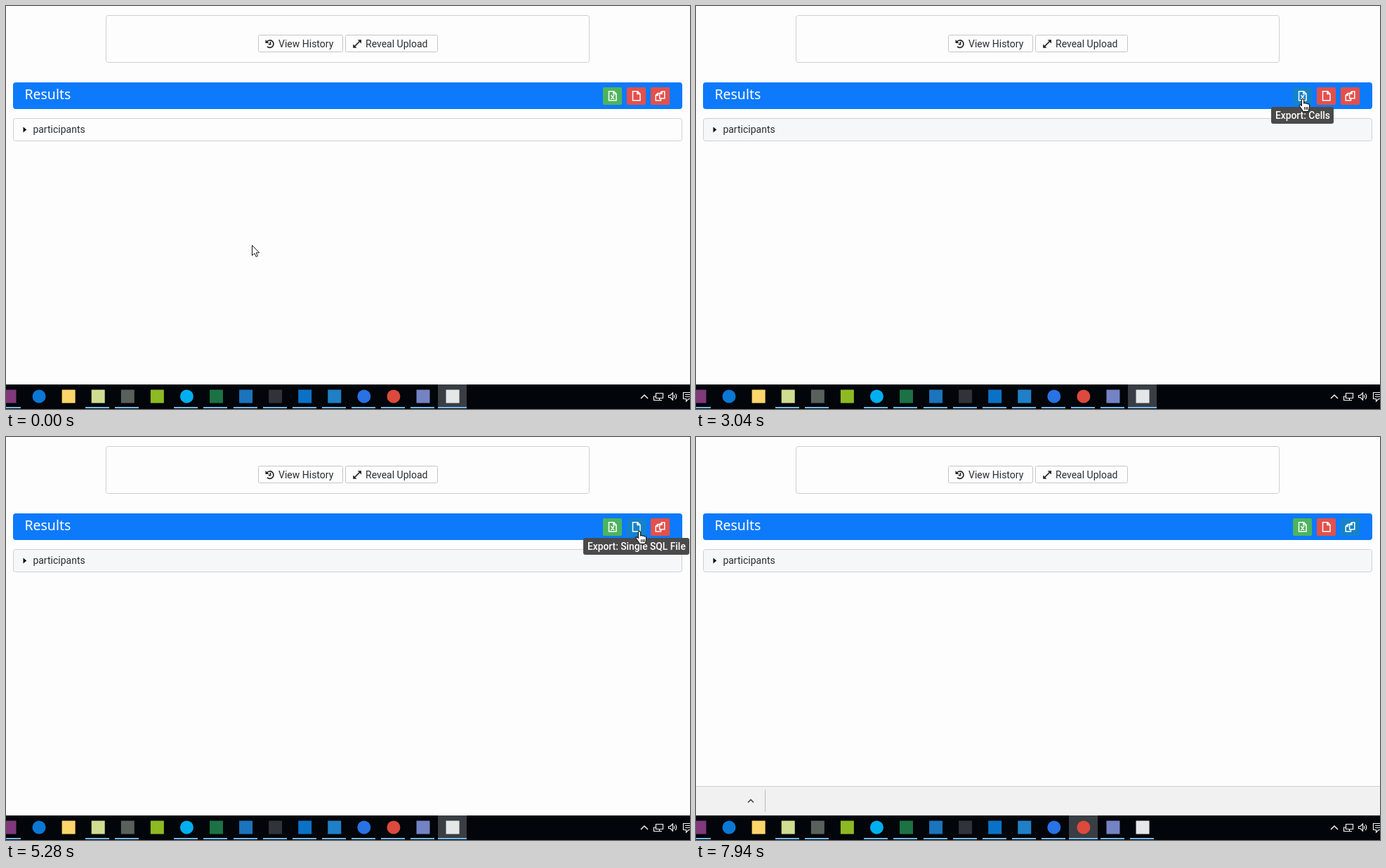
Write an HTML page that moves like this. It is 974x575 px and loops after 8000 ms.

```html
<!DOCTYPE html>
<html lang="en">
<head>
<meta charset="utf-8">
<title>Results export</title>
<style>
  html, body { margin: 0; width: 100%; height: 100%; overflow: hidden; background: #fdfdfd; }
  svg { display: block; width: 974px; height: 575px; }
  text { font-family: Roboto, sans-serif; font-size: 14px; fill: #2b2d30; white-space: pre; }
  .line { fill: none; stroke: #fff; stroke-width: 1.5; }
  .box { fill: #fdfdfd; stroke: #cfcfcf; }
  .tip text { fill: #fff; font-weight: 500; font-size: 13.8px; }
</style>
</head>
<body>
<svg viewBox="0 0 974 575" xmlns="http://www.w3.org/2000/svg">
  <rect width="974" height="575" fill="#fdfdfd"/>
  <rect class="box" x="142.5" y="13.5" width="688" height="67" rx="3"/>
  <g class="box" style="stroke:#c6c6c6">
    <rect x="359.5" y="41.5" width="120" height="24" rx="2"/>
    <rect x="483.5" y="41.5" width="131" height="24" rx="2"/>
  </g>
  <g fill="none" stroke="#222" stroke-width="1.7">
    <path d="M371.6 51A5.2 5.2 0 1 1 372 57.8M376.5 51V54.7H373.8"/>
    <path d="M496.5 57.5L503.5 50.5"/>
  </g>
  <path fill="#222" d="M369.5 48V53H374.5ZM500.7 48.3H506V53.6ZM494.2 54.5V59.8H499.5Z"/>
  <text x="388" y="58.6">View History</text>
  <text x="512" y="58.6">Reveal Upload</text>

  <rect x="10" y="109" width="953" height="38" rx="4" fill="#0d7afc"/>
  <text x="26.4" y="133" style="font:500 19.5px 'Noto Sans',sans-serif;fill:#fff">Results</text>
  <g id="buttons"></g>

  <rect id="row" x="10.5" y="160.5" width="952" height="32" rx="3"/>
  <path d="M24.5 172.5L29.3 176.5L24.5 180.5Z" fill="#111"/>
  <text x="38.4" y="181">participants</text>
  <rect id="underline" x="36" y="182" width="76" height="1" fill="#2b2d30"/>

  <rect id="status" x="-5" y="520.5" width="294.5" height="30" rx="3" fill="#f2f2f2" stroke="#dcdcdc"/>
  <g id="shelf">
    <rect y="498" width="974" height="44" fill="#f1f1f1"/>
    <rect y="498" width="974" height="1" fill="#cfcfcf"/>
    <g id="chip">
      <path d="M74 521.5L78 517.5L82 521.5" fill="none" stroke="#444" stroke-width="1.6"/>
      <rect x="98" y="503" width="1" height="32" fill="#bcbcbc"/>
    </g>
  </g>

  <rect y="540" width="974" height="35" fill="#020509"/>
  <g id="tasks"></g>
  <g fill="none" stroke="#f2f2f2" stroke-width="1.2">
    <path d="M904 560L909 555L914 560" stroke-width="1.5"/>
    <path d="M925.5 552.5H935.5V559.5H925.5ZM930.5 560V562.5M927 562.5H934M925 557H922.5V562.5H927"/>
    <path d="M943.5 555.5H946L949.5 552V562L946 558.5H943.5ZM951.3 555Q952.8 557 951.3 559.2M953.2 553Q956.2 557 953.2 561.2"/>
    <path d="M976 551.5H964.5V560.5H968.5V564L972 560.5H976M967 554.5H974M967 557.5H974"/>
  </g>
  <g id="tips"></g>
  <g id="cursor" stroke="#111" fill="#fff" stroke-linejoin="round">
    <path id="arrow" d="M.5 .5V15L3.9 11.9L6.2 16.8L8.4 15.8L6.2 11H10.7Z"/>
    <path id="hand" d="M-1.6 2A1.6 1.6 0 0 1 1.6 2V7Q3.5 5.8 4.6 7.3Q6.3 6.5 7.3 7.9Q9.5 7.4 9.5 9.1V13Q9.5 15 7.9 18.6H.3Q-.5 16-4.7 11C-5.6 9.4-3.6 8.2-2.5 9.4L-1.6 10.5ZM2.7 12V16M5 12V16M7 12V16" stroke-width="1.1"/>
    <circle id="busy" cx="11.7" cy=".6" r="5" fill="#e8f4ff" stroke="#2a8ded" stroke-width="3.4"/>
  </g>
</svg>
<script>
const $ = id => document.getElementById(id);
const LOOP = 8000, STEP = 72;

function add(parent, tag, attrs, text) {
  const el = document.createElementNS('http://www.w3.org/2000/svg', tag);
  for (const k in attrs) el.setAttribute(k, attrs[k]);
  if (text) el.textContent = text;
  return parent.appendChild(el);
}
const show = (el, on) => el.setAttribute('visibility', on ? 'visible' : 'hidden');
const clamp = v => Math.max(0, Math.min(1, v));
const ramp = (t, a, b) => clamp((t - a) / (b - a));
const within = (t, a, b) => t >= a && t < b;

// Bursts of movement [start, end]; the screen holds between them
const BURSTS = [
  [920, 1640], [1800, 2600], [2680, 3040], [3200, 3560], [3930, 4230], [4840, 4840],
  [5000, 5720], [5810, 5880], [6260, 6340], [6480, 7280], [7360, 7940]
];
function snap(t) {
  let s = 0;
  for (const [a, b] of BURSTS) {
    if (t < a) break;
    if (t >= b) { s = b; continue; }
    const dt = (b - a) / Math.round((b - a) / STEP);
    s = a + Math.floor((t - a) / dt + 0.1) * dt;
  }
  return s;
}

// Pointer route: time, x, y
const ROUTE = [
  [900, 350, 341], [1064, 322, 344], [1496, 145, 188], [1800, 148, 182], [2018, 262, 255],
  [2163.6, 400, 319], [2309, 620, 262], [2455, 815, 203], [2600, 858, 149], [3040, 864, 132],
  [3344, 893, 139], [3930, 908, 137], [4230, 925, 137], [4840, 925, 136], [5288, 902, 134],
  [5720, 919, 132], [6340, 919, 132], [6625.4, 737, 241], [6989, 400, 330], [7280, 350, 346],
  [7432, 372, 325], [7577, 384, 205], [7650, 382, 88], [7795, 354, 15], [7940, 350, -30]
];
function pointer(t) {
  const i = ROUTE.findIndex(k => k[0] >= t);
  const b = ROUTE[i], a = ROUTE[Math.max(0, i - 1)];
  const p = i ? ramp(t, a[0], b[0]) : 1;
  return [1, 2].map(j => Math.round(a[j] + (b[j] - a[j]) * p));
}

const PAGE = 'M-5-6.5H2L5.5-3V6.5H-5ZM1.5-6.5V-2.7H5.5';
const PAGES = 'M-.8-3.2L2.3-6.3H6.3V3.4H-.8ZM-.8-3H2.5V-6.3M-.8-3.8H-3.4L-6.3-1V6.4H1V3.6M-6.3-.8H-3.2V-3.8';
const BUTTONS = [
  { color: '#4db45c', icon: PAGE + 'M-2-1L2.5 4.5M2.5-1L-2 4.5', label: 'Export: Cells', left: 819, width: 89,
    tips: [[2600, 3140]] },
  { color: '#e4504c', icon: PAGE, label: 'Export: Single SQL File', left: 822, width: 151,
    tips: [[3272, 3930], [5072, 5504]] },
  { color: '#e4504c', icon: PAGES, label: 'Export: Multiple SQL Files', left: 848, width: 168,
    tips: [[4005, 5000], [5583, 6190]] }
];
BUTTONS.forEach((b, i) => {
  const x = 850 + 34 * i, mid = x + 13.5, gray = '#4a4a4a';
  b.rect = add($('buttons'), 'rect', { x, y: 116, width: 27, height: 25, rx: 2 });
  add($('buttons'), 'path', { class: 'line', d: b.icon, transform: `translate(${mid} 128.3)` });
  b.tip = add($('tips'), 'g', { class: 'tip' });
  add(b.tip, 'path', { d: `M${mid - 3.5} 144.5l3.5-3.5l3.5 3.5Z`, fill: gray });
  add(b.tip, 'rect', { x: b.left, y: 144, width: b.width, height: 24, rx: 3, fill: gray });
  add(b.tip, 'text', { x: b.left + 6, y: 160.8 }, b.label);
});
const tipOpacity = (b, t) => Math.max(...b.tips.map(([a, z]) => ramp(t, a, a + 210) * (1 - ramp(t, z, z + 145))));

// Button the pointer rests on, or last used
function hotButton(t) {
  if (t < 2670 || within(t, 3260, 3300)) return -1;
  if (t < 3260) return 0;
  return t < 4000 || within(t, 5070, 5570) ? 1 : 2;
}

// Taskbar flags: o = round, - = not running
const TASKS = ('#80397b #0a78d4o- #fbd66b- #cfdc92 #59615d #8dba22- #00aff0o #1d7245 ' +
  '#1b74bc #30343a #0a72c6 #1f80c8 #2872e4o #db4a3do #7483c4 #e4e6e8').split(' ');
const tiles = TASKS.map((task, i) => {
  const x = 5 + i * 42.07, g = $('tasks'), r = 9.5;
  const tile = add(g, 'rect', { x: Math.round(x - 21), y: 540, width: 41, height: 34, fill: '#393e44' });
  const bar = add(g, 'rect', { y: 572, height: 2, fill: '#76b9ed' });
  add(g, 'rect', { x: x - r, y: 557 - r, width: 2 * r, height: 2 * r, rx: task.includes('o') ? r : 0, fill: task.slice(0, 7) });
  show(bar, !task.includes('-'));
  return active => {
    show(tile, active);
    bar.setAttribute('x', Math.round(x - (active ? 21 : 18)));
    bar.setAttribute('width', active ? 41 : 34);
  };
});

function draw(time) {
  const t = snap(time);
  const [x, y] = pointer(t);

  const onRow = within(t, 1490, 2000) || within(t, 2520, 2590) || within(t, 6470, 6690);
  const row = $('row');
  row.setAttribute('fill', onRow ? '#ececee' : t < 1490 ? '#fdfdfd' : '#f6f7f9');
  row.setAttribute('stroke', onRow ? '#bcbdc0' : '#cfd0d2');
  show($('underline'), onRow);

  const hot = hotButton(t);
  BUTTONS.forEach((b, i) => {
    b.rect.setAttribute('fill', i === hot ? '#1583c9' : b.color);
    b.tip.setAttribute('opacity', tipOpacity(b, t));
  });

  $('status').setAttribute('opacity', ramp(t, 1790, 1873) * (1 - ramp(t, 2164, 2310)));
  const rise = ramp(t, 6400, 6553);
  $('shelf').setAttribute('transform', `translate(0 ${42 * (1 - rise)})`);
  show($('shelf'), rise > 0);
  $('chip').setAttribute('transform', `translate(${100 * (ramp(t, 6690, 6916) - 1)} 0)`);

  const active = t < 6260 ? 15 : 13;
  tiles.forEach((set, i) => set(i === active));

  const hand = within(t, 2670, 6260) || within(t, 7715, 7790) || (onRow && t < 6000);
  $('cursor').setAttribute('transform', `translate(${x} ${y})`);
  show($('arrow'), !hand);
  show($('hand'), hand);
  show($('busy'), within(t, 6260, 6950));
}

function tick(now) {
  draw(now % LOOP);
  requestAnimationFrame(tick);
}
draw(0);
requestAnimationFrame(tick);
</script>
</body>
</html>
```
